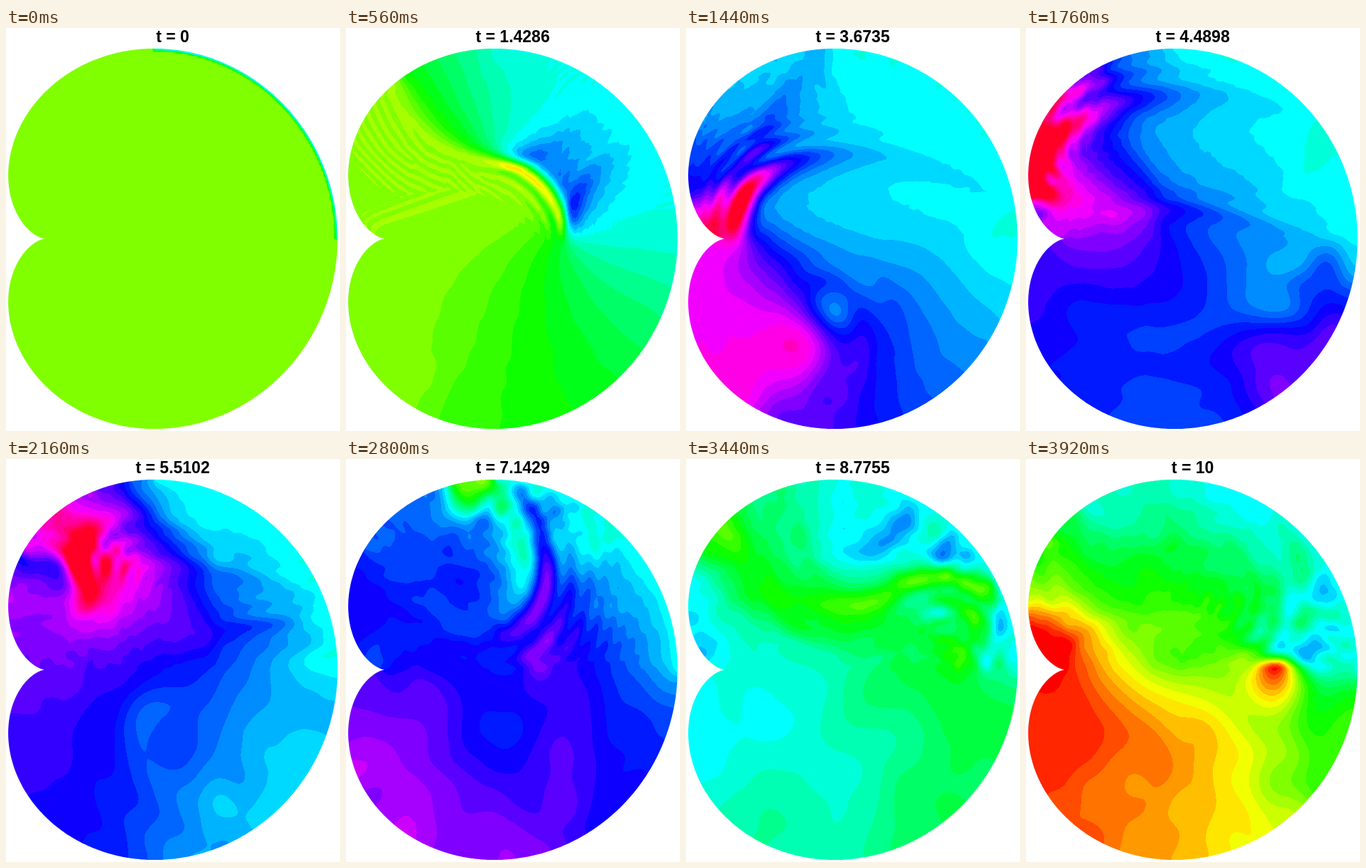
Animation of 470 by 567 pixels, one loop 4 s. Source, as an HTML page with a canvas:

```html
<!DOCTYPE html>
<html lang="en">
<head>
<meta charset="utf-8">
<title>Wave on a cardioid</title>
<style>
  html, body { margin: 0; width: 470px; height: 567px; overflow: hidden; background: #fff; }
  canvas, svg { position: absolute; left: 0; top: 0; display: block; }
  text { font: bold 23px "Liberation Sans", Arial, sans-serif; text-anchor: middle; }
</style>
</head>
<body>
<canvas id="stage" width="470" height="567"></canvas>
<svg width="470" height="567"><text id="label" x="234.6" y="20">t = 0</text></svg>
<script>
const WIDTH = 470, HEIGHT = 567;
const SCALE = 103, X0 = 54.6, Y0 = 296.5;   // pixels per unit, cusp position
const CELL = 3, W = 157, H = 189, SIZE = W * H;
const FRAMES = 50, FRAME_MS = 80, T_END = 10, SUBSTEPS = 64;
const DT = T_END / (FRAMES - 1) / SUBSTEPS;
const LIGHT = 0.1;                          // mass density of the lower half
const STIFF = 0.23;                         // lets short waves run ahead of the front
const DAMP = 0.0002 / DT;                   // slight viscosity
const LEVELS = 40;                          // colour bands for u from -1 to 3

const clamp = (v, lo, hi) => Math.min(hi, Math.max(lo, v));
const rim = a => 2 * (1 + Math.cos(a));

const OUTSIDE = 0, INSIDE = 1, FIXED = 2;
const kind = new Uint8Array(SIZE);
const rate = new Float32Array(SIZE);        // step factor over mass
const east = new Float32Array(SIZE);        // open faces
const south = new Float32Array(SIZE);
const u = new Float32Array(SIZE);
const cells = [];

// Cardioid grid with u = 1 on the first quarter of the rim
function buildGrid() {
  const k = (DT * SCALE / CELL) ** 2, edge = 0.5 * CELL / SCALE;
  for (let j = 0; j < SIZE; j++) {
    const x = ((j % W + 0.5) * CELL - X0) / SCALE;
    const y = (Y0 - (Math.floor(j / W) + 0.5) * CELL) / SCALE;
    const a = Math.atan2(y, x);
    const depth = (rim(a) - Math.hypot(x, y)) * Math.cos(a / 2);
    const held = a >= 0 && a <= Math.PI / 3;
    if (held) u[j] = clamp(1.5 - depth / (2 * edge), 0, 1);
    if (held && depth < edge) kind[j] = FIXED;
    else if (depth > 0) {
      kind[j] = INSIDE;
      rate[j] = y > 0 ? k : k / LIGHT;
      cells.push(j);
    }
  }
  for (let j = 0; j < SIZE - W; j++) {
    const slit = j % W < X0 / CELL - 0.5 && rate[j] < rate[j + W];
    east[j] = kind[j] && kind[j + 1] ? 1 : 0;
    south[j] = kind[j] && kind[j + W] && !slit ? 1 : 0;
  }
}

function laplacian(f, out) {
  for (let i = 0; i < cells.length; i++) {
    const j = cells[i], c = f[j];
    out[j] = east[j] * (f[j + 1] - c) + east[j - 1] * (f[j - 1] - c)
      + south[j] * (f[j + W] - c) + south[j - W] * (f[j - W] - c);
  }
}

// For drawing, cells just outside the rim copy a neighbour
function nearestCells() {
  let src = Int32Array.from(kind, (k, j) => k === OUTSIDE ? -1 : j);
  for (let pass = 0; pass < 2; pass++) {
    const old = src;
    src = old.map((s, j) => {
      if (s >= 0) return s;
      const n = [j + W, j - W, j + 1, j - 1].find(i => old[i] >= 0);
      return n === undefined ? -1 : old[n];
    });
  }
  return src;
}

// Mass * u_tt = div grad u, no flux through the rest of the rim
function simulate() {
  buildGrid();
  const src = nearestCells();
  const v = new Float32Array(SIZE), s = u.slice();
  const lap = new Float32Array(SIZE), lap2 = new Float32Array(SIZE);
  const list = [];
  for (let f = 0; f < FRAMES; f++) {
    list.push(Float32Array.from(src, j => j < 0 ? 0 : u[j]));
    for (let n = 0; n < SUBSTEPS; n++) {
      laplacian(s, lap);
      laplacian(lap, lap2);
      for (let i = 0; i < cells.length; i++) {
        const j = cells[i];
        v[j] += rate[j] * (lap[j] - STIFF * lap2[j]);
        u[j] += v[j];
        s[j] = u[j] + DAMP * v[j];
      }
    }
  }
  return list;
}

const palette = Uint32Array.from({ length: LEVELS }, (_, k) => {
  const h = k * 6 / LEVELS;
  const ch = o => Math.round(255 * clamp(Math.abs((h + o) % 6 - 3) - 1, 0, 1));
  return (255 << 24 | ch(2) << 16 | ch(4) << 8 | ch(0)) >>> 0;
});

const outline = new Path2D();
for (let i = 0; i < 720; i++) {
  const a = i * Math.PI / 360, r = rim(a) * SCALE;
  outline.lineTo(X0 + r * Math.cos(a), Y0 - r * Math.sin(a));
}
outline.closePath();

const label = document.getElementById("label");
const ctx = document.getElementById("stage").getContext("2d");
const buffer = document.createElement("canvas");
buffer.width = WIDTH;
buffer.height = HEIGHT;
const bufferCtx = buffer.getContext("2d");
const image = bufferCtx.createImageData(WIDTH, HEIGHT);
const pixels = new Uint32Array(image.data.buffer);

function draw(f) {
  const field = frames[f];
  for (let y = 0, p = 0; y < HEIGHT; y++) {
    const gy = clamp((y + 0.5) / CELL - 0.5, 0, H - 1.001), row = Math.floor(gy), ty = gy - row;
    for (let x = 0; x < WIDTH; x++, p++) {
      const gx = clamp((x + 0.5) / CELL - 0.5, 0, W - 1.001), col = Math.floor(gx), tx = gx - col;
      const j = row * W + col;
      const top = field[j] + (field[j + 1] - field[j]) * tx;
      const low = field[j + W] + (field[j + W + 1] - field[j + W]) * tx;
      const value = top + (low - top) * ty;
      pixels[p] = palette[clamp(Math.floor((value + 1) * LEVELS / 4 + 1e-5), 0, LEVELS - 1)];
    }
  }
  bufferCtx.putImageData(image, 0, 0);
  ctx.clearRect(0, 0, WIDTH, HEIGHT);
  ctx.save();
  ctx.clip(outline);
  ctx.drawImage(buffer, 0, 0);
  ctx.restore();
  label.textContent = "t = " + Number((f * T_END / (FRAMES - 1)).toPrecision(5));
}

const frames = simulate();

let shown = 0;
draw(0);
const start = performance.now();
function tick() {
  const f = Math.floor((performance.now() - start) / FRAME_MS) % FRAMES;
  if (f !== shown) draw(shown = f);
  requestAnimationFrame(tick);
}
requestAnimationFrame(tick);
</script>
</body>
</html>
```
